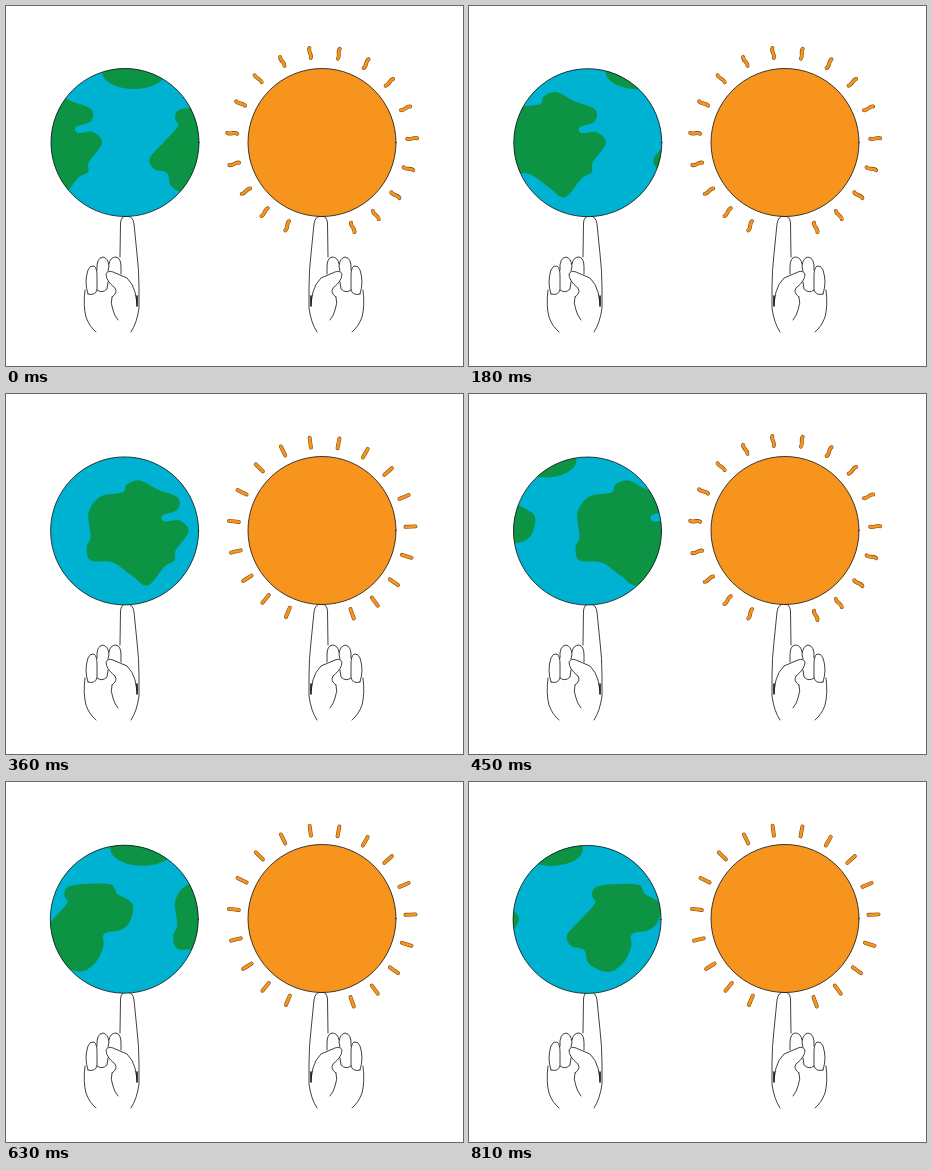
An HTML page that plays this animation: 457x360 px, repeating every 0.9 s.

```html
<!DOCTYPE html>
<html lang="en">
<head>
<meta charset="utf-8">
<title>Earth and sun on fingertips</title>
<style>
  html, body { margin: 0; width: 100%; height: 100%; overflow: hidden; background: #fff; }
  svg { display: block; width: 457px; height: 360px; }
  .line { fill: none; stroke: #111; stroke-width: .8; stroke-linecap: round; stroke-linejoin: round; }
  .ray { fill: none; stroke-linecap: round; }
</style>
</head>
<body>
<svg viewBox="0 0 457 360">
  <defs>
    <clipPath id="disc"><circle cx="119" cy="136.5" r="74"/></clipPath>
    <g id="hand" class="line">
      <path d="M114 251 L114.5 217 Q115 210 120.5 210 Q127 210 128 218 L131 248 Q133 264 133 282 V302 Q131 317 125 326"/>
      <path d="M79 284 Q77 300 80 311 Q83 320 90 326"/>
      <path d="M82 288 Q78 276 82 264 Q84 259 88 260 Q91 262 91 270 V284 Q89 290 82 288"/>
      <path d="M91 264 Q90 252 97 251 Q102 252 103 260 L102 265 M91 284 Q96 288 101 283 L102 276"/>
      <path d="M103 258 Q104 251 110 251 Q115 252 115 261 V268"/>
      <path d="M106 291 Q112 287 109 282 Q100 275 100 268 Q102 264 107 266 L121 272 Q127 278 129 286 L131 297"/>
      <path d="M106 291 Q104 297 107 304 Q108 309 112 314"/>
      <path d="M131 290 V300" stroke-width="1.6"/>
    </g>
  </defs>
  <use href="#hand"/>
  <use href="#hand" transform="matrix(-1 0 0 1 436 0)"/>
  <g id="globe">
    <circle cx="119" cy="136.5" r="74" fill="#00b2d2"/>
    <g clip-path="url(#disc)"><g id="land" fill="#0c9444"></g></g>
    <circle class="line" cx="119" cy="136.5" r="74"/>
  </g>
  <circle class="line" cx="316" cy="136.5" r="74" style="fill:#f7941d"/>
  <path id="rayEdge" class="ray" stroke="#7a4a12" stroke-width="3.9"/>
  <path id="rayFill" class="ray" stroke="#f7941d" stroke-width="2.8"/>
</svg>
<script>
const STEP = 90, WRAP = 284;
const SUN = { x: 316, y: 136.5 };
const $ = id => document.getElementById(id);

// Smooth closed curve through a few key points.
function blob(text) {
  const pts = text.split(' ').map(p => p.split(',').map(Number));
  const at = i => pts[(i + pts.length) % pts.length];
  const handle = (i, sign) => at(i).map((v, k) => v + sign * (at(i + 1)[k] - at(i - 1)[k]) / 6);
  return `M${at(0)}` + pts.map((_, i) => `C${handle(i, 1)} ${handle(i + 1, -1)} ${at(i + 1)}`).join('') + 'Z';
}

// The land lies on an endless strip that slides behind the disc.
const continents = [
  '92,90 105,86 123,95 143,103 143,115 128,121 130,127 145,126 154,137 141,156 140,166 ' +
  '130,172 113,191 97,181 78,168 56,166 52,153 56,142 54,118 66,102 88,98',
  '231,104 252,101 274,102 280,111 295,121 293,138 284,147 267,151 266,164 ' +
  '258,180 243,189 224,181 219,167 206,163 202,152 217,135 230,120 227,113'
].map(blob).join('');
const polarCap = x => `<ellipse cx="${x}" cy="66" rx="32" ry="17"/>`;
$('land').innerHTML = [-WRAP, 0, WRAP].map(x =>
  `<g transform="translate(${x})"><path d="${continents}"/>${polarCap(21)}${polarCap(186)}</g>`).join('');

// Rays go clockwise round the sun, leaving a gap for the finger.
function rayPath(radius, bend) {
  return Array.from({ length: 18 }, (_, i) => {
    const even = 116 + 18.3 * i, rad = even * Math.PI / 180;
    const angle = rad + .07 * Math.cos(rad) * (1 + Math.sin(rad));
    const cos = Math.cos(angle), sin = Math.sin(angle);
    const point = (out, side) =>
      `${SUN.x + cos * (radius + out) - sin * side} ${SUN.y + sin * (radius + out) + cos * side}`;
    return `M${point(-5, 0)}C${point(-2, bend)} ${point(2, -bend)} ${point(5, 0)}`;
  }).join('');
}
const wavyRays = rayPath(90.3, 2), straightRays = rayPath(88.6, 0);

// Hand-keyed spin: strip offset at each step of the loop.
const slide = [-58, -34, -17, 0, 29, 55, 82, 116, 149, 181];

function draw() {
  const step = Math.floor(performance.now() / STEP) % slide.length;
  const drift = step / slide.length;
  $('globe').setAttribute('transform', `translate(${-drift} ${drift})`);
  $('land').setAttribute('transform', `translate(${slide[step]})`);
  const straight = step % 3 === 1 || step === slide.length - 1;
  for (const id of ['rayEdge', 'rayFill']) $(id).setAttribute('d', straight ? straightRays : wavyRays);
  requestAnimationFrame(draw);
}
draw();
</script>
</body>
</html>
```
